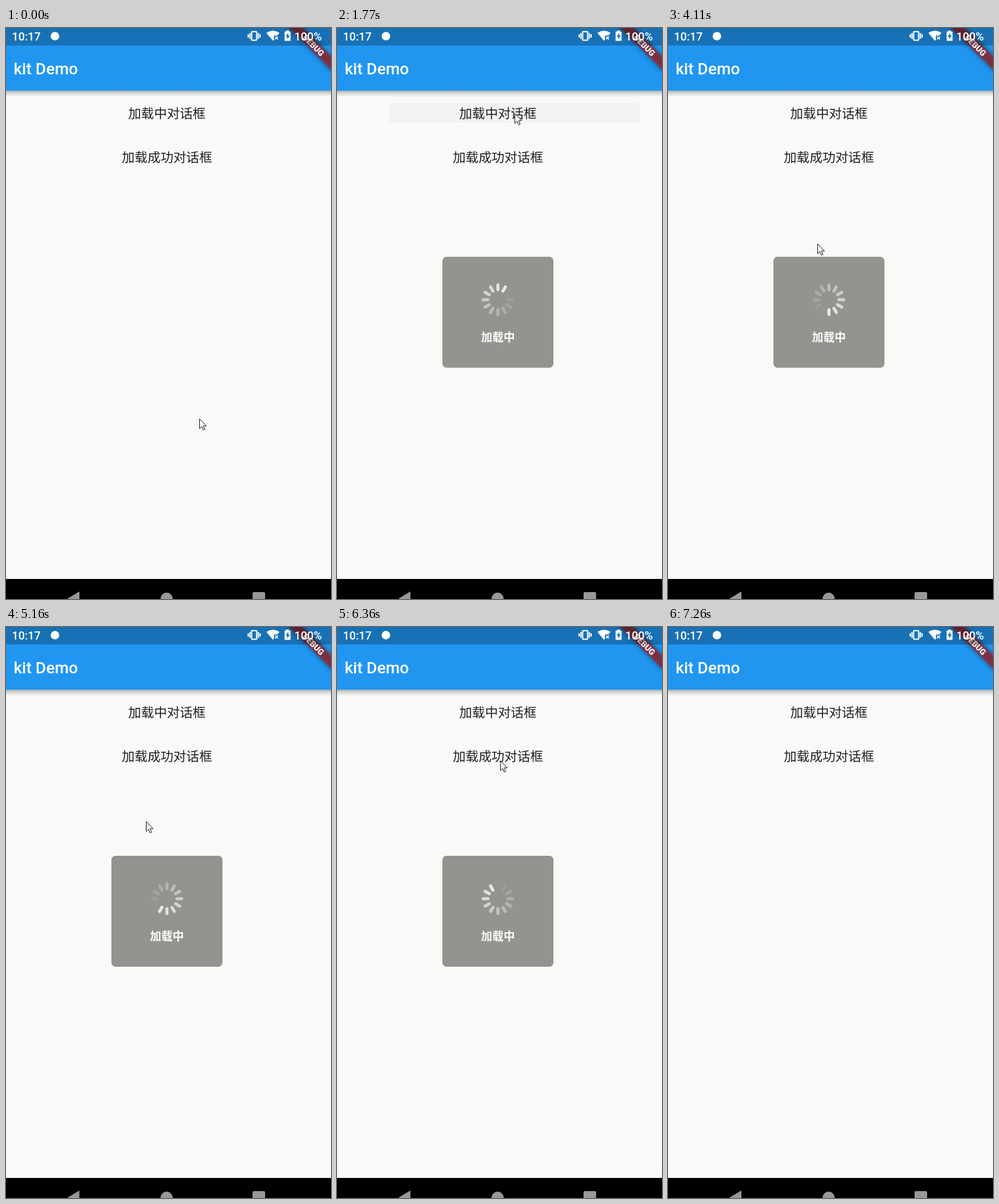
An HTML page for the animation above (7.57 s loop, 518 by 911 pixels).

```html
<!DOCTYPE html>
<html lang="zh-CN">
<head>
<meta charset="utf-8">
<title>kit Demo</title>
<style>
html, body { margin: 0; width: 100%; height: 100%; overflow: hidden; background: #f8faf7; }
svg { display: block; width: 100%; height: 100%; }
text { font-family: Roboto, 'Noto Sans CJK SC', 'Noto Sans CJK', sans-serif; }
.cjk { font-family: 'Noto Sans CJK SC', 'Noto Sans CJK', sans-serif; text-anchor: middle; }
.row { font-size: 20.57px; fill: #20211f; }
.bar { font-size: 18px; font-weight: 500; fill: #fff; }
</style>
</head>
<body>
<svg viewBox="0 0 518 911">
  <defs>
    <linearGradient id="shade" x2="0" y2="1">
      <stop offset="0" stop-opacity=".29"/>
      <stop offset=".4" stop-opacity=".14"/>
      <stop offset="1" stop-opacity="0"/>
    </linearGradient>
    <filter id="blur" x="-20%" y="-150%" width="140%" height="400%">
      <feGaussianBlur stdDeviation="4.5"/>
    </filter>
  </defs>

  <rect width="518" height="911" fill="#f8faf7"/>
  <rect id="tap1" x="83" y="120" width="399" height="31" rx="3" fill="#f1f3f0"/>
  <rect id="tap2" y="190" width="518" height="30" fill="#f3f5f3"/>
  <text class="cjk row" x="256.5" y="144">加载中对话框</text>
  <text class="cjk row" x="256.5" y="214">加载成功对话框</text>

  <rect y="100" width="518" height="10" fill="url(#shade)"/>
  <rect width="518" height="100" fill="#2196f1"/>
  <text x="12.2" y="73.6" font-size="25.7" font-weight="500" fill="#fff">kit Demo</text>

  <g transform="translate(521 -3.2) rotate(45)">
    <rect x="-52" y="36" width="104" height="15.4" opacity=".5" filter="url(#blur)"/>
    <rect x="-52" y="36" width="104" height="15.4" fill="#b71c1c" opacity=".627"/>
    <text y="48.4" font-size="13.1" font-weight="900" fill="#fff" text-anchor="middle">DEBUG</text>
  </g>

  <rect width="518" height="28" opacity=".25"/>
  <text class="bar" x="9.5" y="19.5">10:17</text>
  <text class="bar" x="459.5" y="19.5">100%</text>
  <g fill="#fff">
    <circle cx="78" cy="13" r="6.8"/>
    <path d="M415 7.8Q425.5 .6 436 7.8L432.4 12H427V18.5L425.5 20.5Z"/>
    <path d="M446.5 4h4.5v1.8h2.5v14.7h-9.5v-14.7h2.5z"/>
  </g>
  <path d="M449.8 7.5L445.8 13.8h2.4v4.7l4-6.5h-2.4z" fill="#1970b6"/>
  <g fill="none" stroke="#fff" stroke-width="2">
    <rect x="391.5" y="5.8" width="8" height="13.6" rx="1"/>
    <path d="M388.8 8v9.2M386 10v5.2M402.2 8v9.2M405 10v5.2"/>
    <path d="M428.7 13.5l4.8 4.8m0-4.8l-4.8 4.8" stroke-width="1.6"/>
  </g>

  <g id="dialog">
    <rect x="168" y="365" width="177" height="177" rx="6.5" fill="#929490"/>
    <g id="ticks" transform="translate(256.5 433.5)"></g>
    <text class="cjk" x="256.5" y="499.5" font-size="18" font-weight="700" fill="#fff">加载中</text>
  </g>

  <rect y="879" width="518" height="32"/>
  <g fill="#989898">
    <path d="M117 899V922L98 910.5Z"/>
    <circle cx="256" cy="910.5" r="9.7"/>
    <rect x="393" y="900" width="20" height="20" rx="2"/>
  </g>

  <path id="cursor" d="M.5 .5V16.2L4.1 12.8 6.6 18.5 9 17.4 6.5 11.8H11.4Z"
    fill="#f8f9fa" stroke="#1c1c2c"/>
</svg>
<script>
const LOOP = 7570, FIRST = 250, FRAME = 137.45;
const TICKS = 12, STEP = 81; // spinner advances one tick per STEP ms

const home = { x: 308, y: 623 };
const moves = [
  { from: 110, to: 1090, x: 283, y: 136 },
  { from: 1790, to: 2140, x: 92, y: 60 },
  { from: 2140, to: 2610, x: 238, y: 344 },
  { from: 4300, to: 4710, x: 207, y: 365 },
  { from: 4710, to: 5100, x: 223, y: 310 },
  { from: 5410, to: 5820, x: 260, y: 213 },
  { from: 6510, to: 6980, x: 418, y: 800 },
  { from: 6980, to: 7120, x: 420, y: 855 }
];

const $ = id => document.getElementById(id);
const [dialog, cursor, tap1, tap2] = ['dialog', 'cursor', 'tap1', 'tap2'].map($);

const ticks = Array.from({ length: TICKS }, (_, i) => {
  const r = document.createElementNS('http://www.w3.org/2000/svg', 'rect');
  const attrs = { x: -2.5, y: -26, width: 5, height: 12.5, rx: 2.5,
    fill: '#f2f3f1', transform: `rotate(${i * 360 / TICKS})` };
  for (const k in attrs) r.setAttribute(k, attrs[k]);
  return $('ticks').appendChild(r);
});

const show = (el, on) => el.setAttribute('visibility', on ? 'visible' : 'hidden');
const within = (t, a, b) => t >= a && t < b;
const ease = k => k * k * (3 - 2 * k);

// The screen updates at a fixed rate after a short hold
const snap = t => t < FIRST ? 0 : FIRST + Math.floor((t - FIRST) / FRAME + .3) * FRAME;

function pointerAt(t) {
  let { x, y } = home;
  for (const m of moves) {
    const k = ease(Math.min(1, Math.max(0, (t - m.from) / (m.to - m.from))));
    x += (m.x - x) * k;
    y += (m.y - y) * k;
  }
  return [Math.round(x), Math.round(y)];
}

function spin(elapsed) {
  const head = Math.floor(elapsed / STEP);
  ticks.forEach((r, i) => {
    const age = ((head - i) % TICKS + TICKS) % TICKS;
    r.setAttribute('opacity', .9 * (1 - age / (TICKS - .7)));
  });
}

function draw(t) {
  const q = snap(t);
  const first = within(t, 1650, 5400), second = within(t, 6360, 7110);
  cursor.setAttribute('transform', `translate(${pointerAt(q)})`);
  show(cursor, t < 7260);
  show(tap1, within(t, 1500, 1920));
  show(tap2, within(t, 6210, 6360));
  show(dialog, first || second);
  spin(q - (second ? 6300 : 1656));
}

const began = performance.now();
function tick() {
  draw((performance.now() - began) % LOOP);
  requestAnimationFrame(tick);
}
tick();
</script>
</body>
</html>
```
